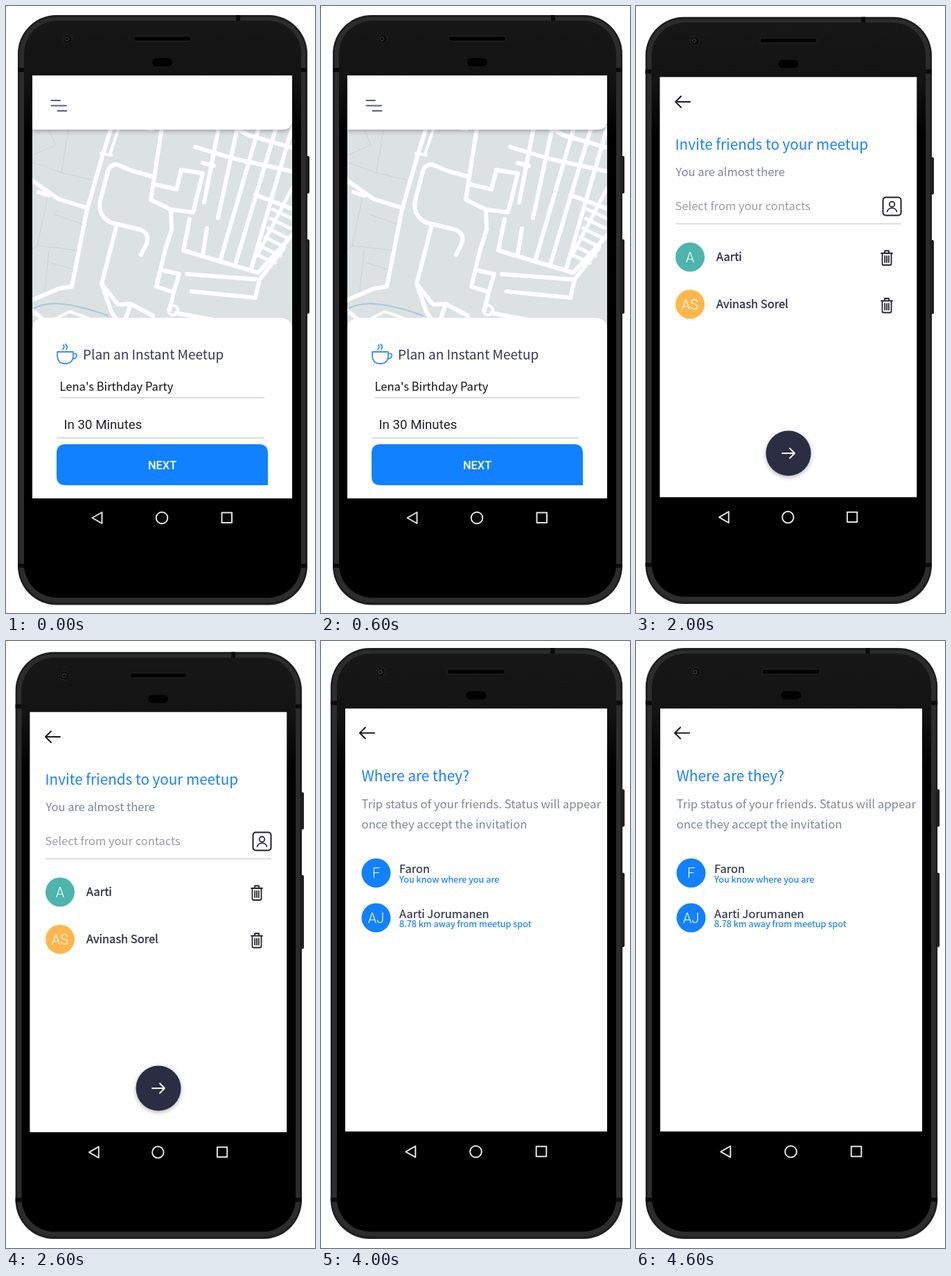
These frames come from a looping animation (446 by 874 pixels, 5000 ms). An HTML page:

```html
<!DOCTYPE html>
<html lang="en">
<head>
<meta charset="utf-8">
<title>Meetup app walkthrough</title>
<style>
  html, body { margin: 0; width: 100%; height: 100%; overflow: hidden; background: #fff; }
  svg { display: block; }
  text { font-family: "Noto Sans CJK SC", "Noto Sans CJK JP", "Noto Sans CJK", "Noto Sans", sans-serif; }

  /* each slide holds for one second of the five second loop */
  .slide { visibility: hidden; animation: show 5s step-end infinite; animation-delay: calc(var(--i) * 1s - 5s); }
  @keyframes show {
    0% { visibility: visible; }
    20%, 100% { visibility: hidden; }
  }

  .title { font-size: 20.7px; fill: #1a82f7; }
  .sub { font-size: 16.5px; fill: #81879a; }
  .hint { font-size: 16.5px; fill: #9c9ea3; }
  .name { font-size: 16.5px; fill: #2b2e43; stroke: #2b2e43; stroke-width: .35; }
  .note { font-size: 12.8px; fill: #1a82f7; stroke: #1a82f7; stroke-width: .2; }
  .bold { font-weight: 700; fill: #fff; }
  .roboto, .label, .street, .initial { font-family: Roboto, sans-serif; }
  .label, .street { paint-order: stroke; stroke: #e6eaea; stroke-width: 2; stroke-linejoin: round; }
  .label { fill: #6f92a5; }
  .street { fill: #65737b; font-size: 12.5px; }
  .initial { font-weight: 300; font-size: 20px; fill: #fff; text-anchor: middle; }
  .end { text-anchor: end; }
  .mid { text-anchor: middle; }

  .line { fill: none; stroke-linecap: round; stroke-linejoin: round; }
  .road { fill: none; stroke: #fff; stroke-linecap: round; stroke-linejoin: round; }
  .rule { stroke: #dcdddf; stroke-width: 2; }
  .land { fill: #dce2e2; }
  .blue { fill: #1181ff; }
  .raised { filter: drop-shadow(0 2px 3px rgba(0, 0, 0, .3)); }
</style>
</head>
<body>
<svg width="446" height="874" viewBox="0 0 446 874">
  <defs>
    <linearGradient id="glass" x1="0" y1="0" x2="0" y2="1">
      <stop offset="0" stop-color="#171717"/>
      <stop offset=".1" stop-color="#131313"/>
      <stop offset=".2" stop-color="#000"/>
    </linearGradient>
    <clipPath id="mapA"><rect x="38" y="170" width="375" height="300"/></clipPath>
    <clipPath id="mapB"><rect x="58" y="348" width="326" height="246"/></clipPath>
    <clipPath id="mapC"><rect x="36" y="170" width="376" height="485"/></clipPath>
    <clipPath id="disc"><circle r="29.5"/></clipPath>

    <g id="phone">
      <rect x="430" y="216" width="8" height="54" rx="2" fill="#1d1d1d"/>
      <rect x="430" y="336" width="8" height="107" rx="2" fill="#1d1d1d"/>
      <rect x="17" y="13" width="418" height="849.5" rx="56" fill="#2c2c2c"/>
      <rect x="18.5" y="15" width="415" height="845" rx="54" fill="none" stroke="#1b1b1b" stroke-width="2"/>
      <path d="M17,92h9M426,92h9M17,806h9M426,806h9M335,13v8" stroke="#0a0a0a" stroke-width="6"/>
      <rect x="26" y="21" width="400" height="831" rx="48" fill="url(#glass)"/>
      <circle cx="89" cy="47.5" r="6.5" fill="#0c0c0c" stroke="#272727"/>
      <circle cx="88" cy="47.5" r="2.6" fill="#050505" stroke="#454545"/>
      <rect x="184" y="43.5" width="83" height="7" rx="3" fill="#030303" stroke="#262626"/>
      <rect x="211" y="75" width="29" height="12" rx="6" fill="#020202"/>
      <rect x="38" y="100" width="375" height="608" fill="#fff"/>
      <g class="line" stroke="#e2e2e2" stroke-width="2">
        <path d="M138.500,729V745L124.500,737Z"/>
        <circle cx="225" cy="737" r="8.300"/>
        <rect x="311.500" y="729.500" width="14.500" height="14.500"/>
      </g>
    </g>

    <path id="back" class="line" stroke="#17181c" stroke-width="2" d="M22,0H1M9,-8L1,0L9,8"/>
    <path id="menu" class="line" stroke="#5c6176" stroke-width="2" d="M65.500,136H78M65.500,143.500H87M74.500,151H87.500"/>
    <g id="go">
      <circle r="32.500" fill="#2b2e43" class="raised"/>
      <path class="line" stroke="#fff" stroke-width="1.800" d="M-9,0H9M2,-7L9,0L2,7"/>
    </g>
    <g id="bin" class="line" stroke="#25262b" stroke-width="2">
      <path d="M-8,-7H8M-3,-8V-10.500H3V-8M-6.500,-7V8Q-6.500,10 -4.500,10H4.500Q6.500,10 6.500,8V-7M-2.800,-3V6M0,-3V6M2.800,-3V6" stroke-width="1.800"/>
    </g>
    <g id="pin">
      <path d="M0,17C-1,9 -10,8 -10,-1A10,10 0 1 1 10,-1C10,8 1,9 0,17Z" fill="#9aa0a3"/>
      <circle r="1.500" cy="16" fill="#7f8588"/>
    </g>
    <g id="shop">
      <use href="#pin"/>
      <path d="M-4.500,-2H4.500V4H-4.500Z" fill="#fff"/>
      <path d="M-2,-2V-5H2V-2" fill="none" stroke="#fff" stroke-width="1.300"/>
    </g>
    <g id="place">
      <use href="#pin"/>
      <path d="M-5,-4H5V4H-5Z" fill="#eef0f0"/>
      <path d="M-3,-1H1M-3,2H3" stroke="#9aa0a3" stroke-width="1.200"/>
    </g>
    <g id="bus">
      <rect x="-5.500" y="-5.500" width="11" height="11" rx="1" fill="#e8f0f5" stroke="#6d93ab" stroke-width="1.500"/>
      <path d="M-3,-3H3V2H-3ZM-2,3.500H-1M1,3.500H2" fill="none" stroke="#6d93ab" stroke-width="1.200"/>
    </g>
  </defs>

  <!-- plan -->
  <g class="slide" style="--i:0">
    <use href="#phone"/>
    <g clip-path="url(#mapA)">
      <rect class="land" x="38" y="170" width="375" height="300"/>
      <path class="line" stroke="#cbd2d3" d="M90,178L80,240L38,225M80,240L122,250M62,178L72,200L38,215M60,275L45,345L38,350M45,345L106,352M70,300L112,315M66,370L100,380M62,352L56,410"/>
      <path class="line" stroke="#a5c7e3" stroke-width="2" d="M38,436Q62,424 95,431T147,446"/>
      <g class="road" stroke-width="6">
        <path d="M152,175L140,213L117,293L95,404L76,407L36,424M36,250L76,278L118,291M47,268L62,273M36,437L52,450"/>
        <path stroke-width="4" d="M163,175L150,214M137,212L152,215M72,450L92,440L120,450"/>
        <path d="M214,246L184,238L160,228Q148,228 146,242L136,280Q132,302 152,312L194,322Q208,328 203,342L195,358"/>
        <path d="M160,315L138,400L152,440L160,452M138,400L162,430L180,429L212,446M180,429L172,452"/>
        <path d="M225,175L209,279L238,293L270,297L284,241L253,236L246,264L212,256M210,177L195,174"/>
        <path d="M238,293L239,322L230,350L217,404L242,412L250,386L228,381M242,412L236,438M246,442L300,452"/>
        <circle cx="241" cy="438" r="7" stroke-width="4"/>
        <path d="M307,175L286,283M334,175L306,305M365,175L310,364M390,175L331,372M413,175L354,378"/>
        <path d="M273,203L330,220L413,238M284,226L300,230M330,175L350,186L413,204M360,272L413,292"/>
        <path d="M265,307L256,352L364,384L413,330M290,320L284,358M261,386L366,394L360,420L268,411M366,394L400,350"/>
        <path stroke-width="5" d="M413,262L362,360M385,293L413,306M382,306L410,320M378,320L406,334M374,333L402,347M368,346L396,360M362,358L388,370"/>
      </g>
    </g>
    <path class="raised" d="M38,100H413V164Q413,178 399,178H38Z" fill="#fff"/>
    <use href="#menu"/>
    <path d="M38,709V467Q38,449 56,449H395Q413,449 413,467V709Z" fill="#fff"/>
    <path class="line" stroke="#3a91f5" stroke-width="1.800" d="M74,498H97V503Q97,514 87,515H84Q74,514 74,503ZM97,501Q103,499 102,504Q101,508 96,508M82,494Q85,491 83,488M87,494Q90,491 86,487"/>
    <text x="111" y="508.500" font-size="19" fill="#353a50">Plan an Instant Meetup</text>
    <text x="77.500" y="554" font-size="16.600" fill="#111">Lena's Birthday Party</text>
    <path class="rule" d="M78,564H373M73,622H372"/>
    <text class="roboto" x="83.500" y="609" font-size="18.700" fill="#202124">In 30 Minutes</text>
    <path class="blue" d="M86,631H365Q378,631 378,644V690H86Q73,690 73,677V644Q73,631 86,631Z"/>
    <text class="roboto mid" x="225.500" y="667" font-size="16.400" font-weight="500" fill="#fff">NEXT</text>
  </g>

  <!-- spot -->
  <g class="slide" style="--i:1">
    <use href="#phone" transform="translate(-2.500 .8) scale(.987 .9918)"/>
    <use href="#back" x="57" y="135.500"/>
    <text class="title" x="58.500" y="192">Set the meet-up spot</text>
    <text class="sub" x="58.500" y="230.500">Where are you planning to meet?</text>
    <text class="name" x="58" y="270.500" style="fill:#17181c;stroke:#17181c">Kettlino</text>
    <path class="rule" d="M59,280.500H371" style="stroke:#e4e5e7"/>
    <text class="hint" x="57.500" y="320">House No, Floor No, Apartment Name</text>
    <path class="rule" d="M59,329H369"/>
    <g clip-path="url(#mapB)">
      <rect class="land" x="58" y="348" width="326" height="246"/>
      <path d="M226,469L268,464V494L224,490Z" fill="#98d873"/>
      <path d="M240,594L246,586L256,594Z" fill="#98d873"/>
      <g class="road" stroke-width="4">
        <path d="M58,382L90,376L126,386M58,408L134,400M58,440L100,424L140,436M70,348L84,400L98,470M96,348L108,394L116,440M58,470L96,462L150,472M58,500L104,492L160,505M58,530L110,520L166,535M58,562L108,548L176,568M76,478L88,594M112,440L132,594M58,352L110,362M64,580L150,594"/>
        <path d="M134,360L160,376L208,380M140,395L208,402M146,425L210,428M154,470L214,468M164,500L222,497M174,530L235,524M184,560L250,552M160,348L172,400L190,470L218,594M190,348L196,425M154,455L176,494"/>
        <path d="M222,372L384,360M218,398L384,386M214,436L384,426M220,462L384,452M240,508L384,488M250,536L384,518M260,560L384,548M266,584L384,574"/>
        <path d="M246,348L242,436M270,348L268,530M290,348L294,455M318,348L322,430M344,348L350,455M368,348L374,490M296,455L290,530L278,594M324,455L318,510L302,594M352,455L346,530L334,594M376,490L364,594"/>
        <path stroke-width="8" d="M222,348L212,390L210,440L220,490L246,548L268,600"/>
        <path stroke-width="6" d="M58,455L88,430L128,410L210,416"/>
      </g>
      <path class="line" stroke="#a8cfe8" stroke-width="5" d="M121,346L134,394L158,460L178,535L200,598"/>
    </g>
    <g font-size="14.700">
      <text class="label end" x="234" y="367.500">ELT Hospital</text>
      <text class="label end" x="206" y="454">Kettlino</text>
    </g>
    <text class="street" transform="translate(237 459) rotate(-3)">14th C Dale Rd</text>
    <text class="street" transform="translate(279 501) rotate(-4)">15th Dale Rd</text>
    <text class="street" transform="translate(331 352) rotate(88)">6th Grove</text>
    <text class="street" transform="translate(305 586) rotate(-78)">9th Grove Rd</text>
    <text class="street" transform="translate(97 480) rotate(77)">Professor T K Solem</text>
    <use href="#pin" x="250" y="366"/>
    <path d="M247,362V370M253,362V370M247,366H253" stroke="#fff" stroke-width="1.600"/>
    <use href="#pin" x="306" y="406"/>
    <path class="line" d="M302,402H310L306,406ZV410M304,410H308" stroke="#fff" stroke-width="1.300"/>
    <use href="#pin" x="220" y="452"/>
    <path d="M216,449H223V455H216Z" fill="#fff"/>
    <path d="M242,452V468" stroke="#f5b512" stroke-width="2.500"/>
    <circle cx="242" cy="444" r="10.500" fill="#fdbb0b"/>
    <circle cx="242" cy="439.500" r="2.200" fill="#fff3cf"/>
    <circle cx="98" cy="574" r="10" fill="#666b6e"/>
    <use href="#go" x="220.500" y="639.500"/>
  </g>

  <!-- invite -->
  <g class="slide" style="--i:2">
    <use href="#phone" transform="translate(-3.200 2.800) scale(.989 .995)"/>
    <use href="#back" x="56" y="138"/>
    <text class="title" x="56.500" y="206.500">Invite friends to your meetup</text>
    <text class="sub" x="57.500" y="245">You are almost there</text>
    <text class="hint" x="56.500" y="293.500">Select from your contacts</text>
    <path class="rule" d="M57,313.500H383"/>
    <g class="line" stroke="#202126" stroke-width="2">
      <rect x="356.500" y="275.500" width="26" height="26" rx="4"/>
      <circle cx="369.500" cy="285.500" r="3.800" stroke-width="1.700"/>
      <path stroke-width="1.700" d="M362.500,296Q364,291 369.500,291T376.500,296"/>
    </g>
    <circle cx="78" cy="361.500" r="21" fill="#4db5ab"/>
    <text class="initial" x="78" y="368.500">A</text>
    <text class="name" x="116" y="367">Aarti</text>
    <use href="#bin" x="362" y="363"/>
    <circle cx="78" cy="429.500" r="21" fill="#ffb74d"/>
    <text class="initial" x="78" y="436.500">AS</text>
    <text class="name" x="116" y="435">Avinash Sorel</text>
    <use href="#bin" x="362" y="431.500"/>
    <use href="#go" x="220" y="644"/>
  </g>

  <!-- live map -->
  <g class="slide" style="--i:3">
    <use href="#phone" transform="translate(-2.100 -3.300) scale(1.0027 1.0033)"/>
    <g clip-path="url(#mapC)">
      <rect class="land" x="36" y="170" width="376" height="485"/>
      <g class="road" stroke-width="5">
        <path d="M36,200L70,208L110,204L140,212M50,236L82,240L76,268M82,175L110,215L116,255L125,340M36,232L58,238M140,175L144,215L136,250M112,190L200,200M144,215L200,224L262,240M150,240L260,262M165,175L172,230M196,175L190,270M232,232L220,300M262,222L245,310"/>
        <path d="M36,330L80,312L125,340M100,300L106,325L128,345L150,352L186,348M128,345L195,380L214,405L228,445L262,485M150,352L205,385L232,432L268,478"/>
        <path d="M262,240L330,255L384,250M250,270L325,292M245,300L310,318M288,225L262,330M318,222L292,330M345,230L322,300M262,330L300,345M384,250L412,225M345,352L330,372L305,368M305,368L290,392L278,400M290,392L306,400M362,180L375,225M300,175L290,225"/>
        <path d="M36,510L74,525L110,520L200,535M74,525L58,600L50,655M98,440L88,520M110,520L96,655M140,500L130,570M175,490L160,560M205,490L182,550M232,490L206,540M36,560L62,568M110,500L205,515M36,600L140,626M120,470L230,502M68,470L80,478"/>
        <path d="M290,500L278,530L300,575L330,600L412,640M262,545L330,572M244,570L236,655M278,560L262,655M308,590L290,655M340,606L322,655M205,590L330,640M222,560L200,620L190,655M300,450L345,500L412,520M338,400L412,430M352,370L412,390M385,330L372,430M335,440L322,472M355,505L340,560"/>
      </g>
      <path class="line" stroke="#a9cbdc" stroke-width="1.500" d="M272,492Q300,505 305,540T345,600"/>
      <path class="line" stroke="#b6cbd3" stroke-width="3" d="M30,364L140,397L212,424"/>
      <path d="M36,371L204,425L200,438L36,384Z" fill="#93d36f"/>
      <path class="line" stroke="#ebefef" stroke-width="29" d="M424,240L382,305L318,420L270,488L160,620L120,668"/>
      <path class="line" stroke="#c1cdd1" stroke-width="25" d="M424,240L382,305L318,420L270,488L160,620L120,668"/>
    </g>
    <g font-size="16.400">
      <text class="label end" x="380" y="200">Oluvi Bank Thorusenda,</text>
      <text class="label end" x="380" y="219.500">Main Road Belvanore…</text>
      <text class="label end" x="320.500" y="336">Anvo Cooking Point</text>
      <text class="label mid" x="105.500" y="387">KT Solanam</text>
      <text class="label mid" x="106" y="406.500">North</text>
      <text class="label mid" x="106" y="426">City Park</text>
      <text class="label end" x="204.500" y="473.500">Velumora Mall</text>
      <text class="label" x="245" y="557">Hodarner faith</text>
      <text class="label" x="255" y="577">prayer house</text>
    </g>
    <text class="street" transform="translate(59 528) rotate(-72)">5th Belor Rd</text>
    <text class="street" transform="translate(38 636) rotate(17)">Taruveshi Pat</text>
    <use href="#place" x="398" y="198"/>
    <use href="#place" x="338" y="325"/>
    <use href="#shop" x="316.500" y="427"/>
    <use href="#shop" x="222" y="477"/>
    <use href="#place" x="366" y="558"/>
    <use href="#bus" x="269" y="494.500"/>
    <use href="#bus" x="148" y="613.500"/>

    <g transform="translate(121.500 282)" clip-path="url(#disc)">
      <circle r="29.500" class="blue"/>
      <path d="M-13,18Q-17,-20 0,-21Q17,-20 14,18Q8,22 0,20Q-8,22 -13,18Z" fill="#d99644"/>
      <path d="M-22,30Q-20,17 -5,17H5Q20,17 22,30Z" fill="#6a2c3a"/>
      <path d="M-4,10H4V18Q0,23 -4,18Z" fill="#efbd9a"/>
      <path d="M-9.500,-6Q2,-8 4,-13Q9,-8 9.500,-3Q10,10 0,14Q-10,10 -9.500,-6Z" fill="#fbd3b4"/>
      <path d="M-5,-1H-3M3,-1H5" stroke="#4b3527" stroke-width="2"/>
      <path d="M-3,7Q0,10 3,7Z" fill="#cf4b4b"/>
    </g>
    <g transform="translate(216 336)" clip-path="url(#disc)">
      <circle r="29.500" class="blue"/>
      <path d="M-24,30Q-22,16 -6,15H6Q22,16 24,30Z" fill="#86c02f"/>
      <path d="M-5,9H5V16Q0,21 -5,16Z" fill="#e8b58f"/>
      <path d="M-11,-8H11Q14,12 0,15Q-14,12 -11,-8Z" fill="#f8cfae"/>
      <path d="M-12,0Q-16,-17 -4,-18Q13,-22 13,-7L12,0L9,-8Q0,-6 -5,-10L-10,-6Z" fill="#45302c"/>
      <path d="M-6,-1H-3M3,-1H6" stroke="#45302c" stroke-width="2"/>
      <path d="M-3,8Q0,10 4,7" fill="none" stroke="#a95746" stroke-width="1.300"/>
    </g>

    <g fill="#fff" class="raised">
      <circle cx="360.500" cy="465" r="24.500"/>
      <circle cx="360.500" cy="535.500" r="24.500"/>
      <circle cx="360.500" cy="606" r="24.500"/>
    </g>
    <g transform="translate(360.500 465)">
      <path d="M-17,8Q-16,-1 -10,0L-5,10H-17Z" fill="#f0b339"/>
      <path d="M5,10L9,0Q16,0 17,9Z" fill="#34466b"/>
      <circle cx="-9" cy="-8" r="7" fill="#5b3a31"/>
      <circle cx="-8" cy="-5" r="5" fill="#f4c5a3"/>
      <circle cx="9" cy="-9" r="7" fill="#30313a"/>
      <circle cx="9" cy="-5" r="5" fill="#f4c5a3"/>
      <circle cy="2" r="7.500" fill="#de4b3e"/>
      <circle cy="4" r="5" fill="#fbd3b4"/>
      <path d="M-9,16Q-8,9 0,9T9,16Z" fill="#e75b4c"/>
    </g>
    <g class="line" stroke="#1181ff" stroke-width="2" transform="translate(360.500 535)">
      <circle r="2.500" fill="#1181ff"/>
      <path d="M-5,-4Q-8,0 -5,4M5,-4Q8,0 5,4M-8,-6.500Q-12,0 -8,6.500M8,-6.500Q12,0 8,6.500M-11,-9Q-16,0 -11,9M11,-9Q16,0 11,9"/>
    </g>
    <path class="blue" d="M369,598L351,606L359,608L361,616Z"/>
    <path class="blue raised" d="M76,528H131Q146,528 146,543V606Q146,613 139,613H76Q61,613 61,598V543Q61,528 76,528Z"/>
    <text class="bold mid" x="103.500" y="580" font-size="23" style="font-weight:900">SOS</text>
    <path class="raised" d="M36,97H412V161Q412,175 398,175H36Z" fill="#fff"/>
    <use href="#menu" x="-2" y="-2.500"/>
    <rect class="blue" x="36" y="653.500" width="376" height="53.500"/>
    <g font-size="12.900">
      <text class="bold" x="60" y="676.500">Meetup in Tea Maluvandora for Lena's</text>
      <text class="bold" x="60" y="694.500">Birthday at 06:00 PM</text>
      <text class="bold mid" x="361" y="685.500">EXIT</text>
    </g>
  </g>

  <!-- status -->
  <g class="slide" style="--i:4">
    <use href="#phone" transform="translate(-3.300 -2.900) scale(1.008 1.0016)"/>
    <use href="#back" x="55" y="132.500"/>
    <text class="title" x="58.500" y="201.500" style="font-size:20.900px">Where are they?</text>
    <g style="font-size:16.750px">
      <text class="sub" x="58.500" y="240.500" style="font-size:inherit">Trip status of your friends. Status will appear</text>
      <text class="sub" x="58.500" y="269.500" style="font-size:inherit">once they accept the invitation</text>
    </g>
    <circle class="blue" cx="79.500" cy="334" r="21"/>
    <text class="initial" x="79.500" y="341">F</text>
    <text class="name" x="113" y="334" style="stroke-width:.15">Faron</text>
    <text class="note" x="113" y="347.500">You know where you are</text>
    <circle class="blue" cx="79.500" cy="398.500" r="21"/>
    <text class="initial" x="79.500" y="405.500">AJ</text>
    <text class="name" x="113" y="398.500" style="stroke-width:.15">Aarti Jorumanen</text>
    <text class="note" x="113" y="412">8.78 km away from meetup spot</text>
  </g>
</svg>
</body>
</html>
```
